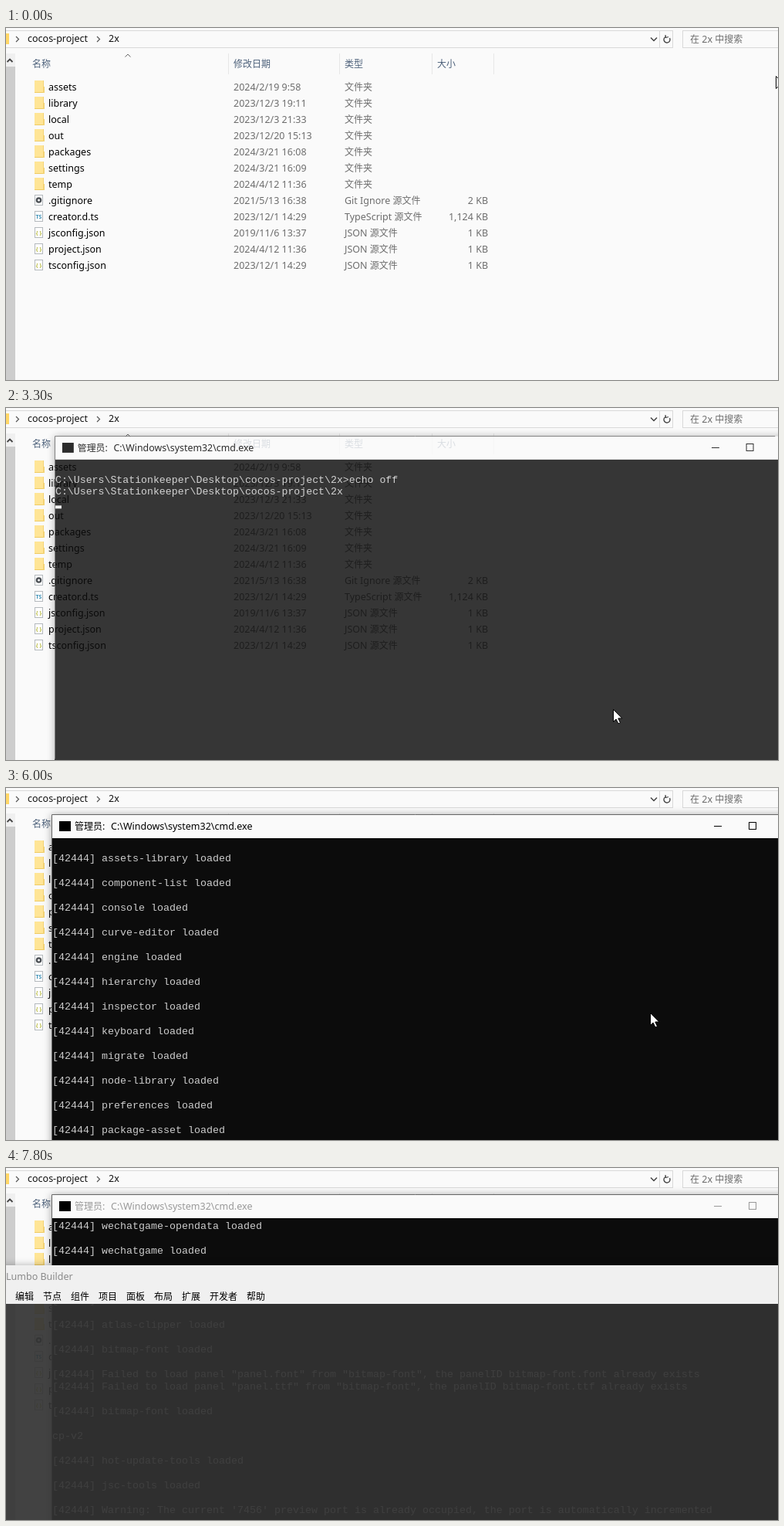
Write an HTML page with a canvas that moves like this. It is 1001x456 px and loops after 7.9 s.

```html
<!DOCTYPE html>
<html lang="zh">
<head>
<meta charset="utf-8">
<title>Open project from the context menu</title>
<style>
html, body { margin: 0; width: 100%; height: 100%; overflow: hidden; background: #fafafa; }
canvas { display: block; }
</style>
</head>
<body>
<canvas id="stage" width="1001" height="456"></canvas>
<script>
const W = 1001, H = 456, LOOP = 7900, STEP = 100;
const stage = document.getElementById('stage').getContext('2d');
const sheet = document.createElement('canvas');
sheet.width = W; sheet.height = H;
const sheetCtx = sheet.getContext('2d');
let g = stage;

const UI = { latin: '12.5px "Noto Sans", "Open Sans", sans-serif', cjk: '12px "Noto Sans CJK SC", "Noto Sans CJK", sans-serif' };
const MONO = { latin: '13.333px "Liberation Mono", monospace', cjk: '300 16px "Noto Sans CJK SC", "Noto Sans CJK", sans-serif' };
const GREY = '#6d6d6d', PAGE = '#fafafa';

// Latin and CJK runs have their own font sizes; returns the end of the text.
function text(s, x, y, color, face = UI) {
  g.fillStyle = color;
  for (const run of s.match(/[\u2e80-\uffef]+|[^\u2e80-\uffef]+/g) || []) {
    g.font = run.charCodeAt(0) > 0x2e7f ? face.cjk : face.latin;
    g.fillText(run, x, y);
    x += g.measureText(run).width;
  }
  return x;
}

function box(x, y, w, h, fill, line) {
  if (fill) { g.fillStyle = fill; g.fillRect(x, y, w, h); }
  if (line) { g.lineWidth = 1; g.strokeStyle = line; g.strokeRect(x + .5, y + .5, w - 1, h - 1); }
}

function path(points, color, width = 1, fill) {
  g.beginPath();
  points.forEach(([x, y]) => g.lineTo(x, y));
  if (fill) { g.closePath(); g.fillStyle = fill; g.fill(); }
  g.strokeStyle = color; g.lineWidth = width; g.stroke();
}

function disc(x, y, r, color) {
  g.beginPath(); g.arc(x, y, r, 0, 7); g.fillStyle = color; g.fill();
}

// Draws a group as one translucent sheet, scaled about (cx, cy).
function layer(alpha, scale, cx, cy, draw) {
  g = sheetCtx;
  g.setTransform(1, 0, 0, 1, 0, 0);
  g.clearRect(0, 0, W, H);
  g.setTransform(scale, 0, 0, scale, cx * (1 - scale), cy * (1 - scale));
  draw();
  g = stage;
  g.globalAlpha = alpha;
  g.drawImage(sheet, 0, 0);
  g.globalAlpha = 1;
}

function shadowed(draw) {
  g.save();
  g.shadowColor = 'rgba(0,0,0,.35)'; g.shadowBlur = 10; g.shadowOffsetY = 1;
  draw();
  g.restore();
}

// Keys are [time, value...]; an optional ease shapes each span.
function track(keys, t, ease = u => u) {
  let i = 0;
  while (i < keys.length - 1 && keys[i + 1][0] <= t) i++;
  const a = keys[i], b = keys[i + 1] || a;
  const u = b === a ? 0 : ease(Math.max(0, (t - a[0]) / (b[0] - a[0])));
  return a.slice(1).map((v, k) => v + (b[k + 1] - v) * u);
}

// ---- file explorer ----
const FILES = [
  ['assets', '2024/2/19 9:58'], ['library', '2023/12/3 19:11'], ['local', '2023/12/3 21:33'],
  ['out', '2023/12/20 15:13'], ['packages', '2024/3/21 16:08'], ['settings', '2024/3/21 16:09'],
  ['temp', '2024/4/12 11:36'],
  ['.gitignore', '2021/5/13 16:38', 'Git Ignore', '2 KB'],
  ['creator.d.ts', '2023/12/1 14:29', 'TypeScript', '1,124 KB'],
  ['jsconfig.json', '2019/11/6 13:37', 'JSON', '1 KB'],
  ['project.json', '2024/4/12 11:36', 'JSON', '1 KB'],
  ['tsconfig.json', '2023/12/1 14:29', 'JSON', '1 KB']
];

function icon(kind, y) {
  if (!kind) {
    box(37, y - 8, 12, 16, '#ffe596');
    box(37, y + 7, 13, 1, '#efcb62');
    box(48, y - 8, 1, 8, '#f3d375');
    box(48, y, 2, 8, '#f3d375');
    return;
  }
  box(37, y - 7, 11, 14, '#fff', '#b4b9bd');
  if (kind === 'Git Ignore') {
    disc(42.5, y, 3.8, '#4a4f54');
    disc(42.5, y, 1.5, '#fff');
  } else {
    g.textAlign = 'center';
    g.font = 'bold 7px "Open Sans", sans-serif';
    g.fillStyle = kind === 'JSON' ? '#b5b83a' : '#3b8fb5';
    g.fillText(kind === 'JSON' ? '{ }' : 'TS', 42.5, y + 2.5);
    g.textAlign = 'left';
  }
}

function explorer(focused) {
  box(0, 0, W, H, PAGE);
  box(-2, 3, 867, 23, null, '#d9d9d9');
  box(847, 4, 1, 21, '#d9d9d9');
  box(877, 3, 130, 23, null, '#d9d9d9');
  box(0, 7, 4, 14, '#ffd766');
  for (const x of [13, 118]) path([[x, 11], [x + 3.5, 14.5], [x, 18]], '#555', 1.2);
  text('cocos-project', 28, 18, '#111');
  text('2x', 133, 18, '#111');
  path([[836, 12.5], [840, 16.5], [844, 12.5]], '#444', 1.5);
  g.beginPath(); g.arc(857, 15, 4, -.5, 4.4); g.lineWidth = 1.4; g.stroke();
  path([[855, 9], [855.5, 12.5], [859, 11.5]], '#444', 1.3);
  text('在 2x 中搜索', 887, 18.5, GREY);

  box(0, 33, 12, H, '#f0f0f0');
  box(0, 50, 12, H, '#cdcdcd');
  path([[1.5, 44], [5, 40.5], [8.5, 44]], '#444', 1.8);

  const head = '#4c607a';
  for (const [label, x] of [['名称', 34], ['修改日期', 295], ['类型', 439], ['大小', 559]]) text(label, x, 51, head);
  for (const x of [288, 432, 552, 632]) box(x, 33, 1, 27, '#e7e7e7');
  path([[154.5, 37.5], [158, 34], [161.5, 37.5]], '#666');

  FILES.forEach(([name, date, kind, size], i) => {
    const y = 76 + 21 * i;
    icon(kind, y);
    text(name, 55, y + 5, '#000');
    text(date, 295, y + 5, GREY);
    text(kind ? kind + ' 源文件' : '文件夹', 439, y + 5, GREY);
    if (size) { g.textAlign = 'right'; text(size, 625, y + 5, GREY); g.textAlign = 'left'; }
  });
  if (focused) box(31, 297, 598, 22, null, '#99d1ff');
}

// ---- context menu ----
const MENU = [
  ['查看(V)', 219], ['排序方式(O)', 241], ['分组依据(E)', 263], ['刷新(R)', 285],
  ['自定义文件夹(F)...', 315], ['粘贴(P)', 345, 1], ['粘贴快捷方式(S)', 367, 1],
  ['cce open', 389], ['授予访问权限(G)', 419], ['新建(W)', 449]
];

function menuItem([label, y, disabled], hot) {
  if (hot) box(744, y - 11, W, 22, '#fff');
  if (label === 'cce open') disc(760, y, 6.5, '#555');
  text(label, 776, y + 4.5, disabled ? GREY : '#000');
}

function contextMenu(mouseY) {
  shadowed(() => box(741, 205, W, H, '#eee'));
  box(741, 205, W, H, null, '#a0a0a0');
  for (const y of [300, 330, 404, 434]) box(769, y, W, 1, '#c6c6c6');
  MENU.forEach(item => menuItem(item, Math.abs(mouseY - item[1]) < 11));
}

// ---- console ----
const HOME = 'C:\\Users\\Stationkeeper\\Desktop\\cocos-project\\2x';
const BLUE = '#3b78ff', CYAN = '#3a96dd', GREEN = '#13a10e', PLAIN = '#ccc', BRIGHT = '#f2f2f2';
const QUESTION = [['? ', GREEN], ['请选择打开项目使用的creator编辑器 ', BRIGHT]];
const INTRO = ['', HOME + '>echo off', HOME];
const ASKING = [...INTRO, [...QUESTION, ['(Use arrow keys)', PLAIN]], [['> 2.4.10', CYAN]]];

const loaded = names => names.split(' ').flatMap(n => [`[42444] ${n} loaded`, '']);
const clash = id => `[42444] Failed to load panel "panel.${id}" from "bitmap-font", the panelID bitmap-font.${id} already exists`;
const OUTPUT = [
  ...INTRO,
  [...QUESTION, ['2.4.10', CYAN]],
  [[`E:\\cocos-editors\\2.4.10\\CocosCreator.exe --nologin --path ${HOME} --inspect=2021`, BLUE]],
  [['请使用chrome浏览器打开： chrome://inspect/#devices', GREEN]],
  [['在Configure增加配置 localhost:2021', GREEN]],
  [['详细教程: https://juejin.cn/post/7047050908865134628/', GREEN]],
  '',
  ...loaded('app asset-db assets-library component-list console curve-editor engine hierarchy inspector keyboard migrate node-library preferences package-asset'),
  ...loaded('package-manager runtime-adapters runtime-dev-tools ui-kit-preview-extra ui-kit-preview alipay-minigame assets baidugame-opendata baidugame builder bytedance-opendata bytedance'),
  ...loaded('cocos-play cocos-runtime cocos-services cpk-publish fb-instant-games huawei-agc jkw-game link-sure oppo-runtime qgame quickgame vivo-runtime'),
  ...loaded('wechatgame-opendata wechatgame wechatgame-subcontext xiaomi-runtime atlas-clipper bitmap-font'),
  clash('font'), clash('ttf'), '',
  ...loaded('bitmap-font'), 'cp-v2', '', ...loaded('hot-update-tools jsc-tools'),
  "[42444] Warning: The current '7456' preview port is already occupied, the port is automatically incremented"
];
const SCROLL = [[5400, 0], [5500, 4], [5600, 8], [5800, 8], [6600, 24], [7000, 36], [7100, 36], [7700, 85]];

function consoleWindow(t) {
  shadowed(() => box(59, 34, W, H, '#0c0c0c'));
  box(59, 34, W, 31, '#fafafa');
  path([[W, 34.5], [59.5, 34.5], [59.5, H]], '#666');
  box(69, 43, 15, 13, '#000');
  const ink = t < 7700 ? '#000' : '#999';
  text('管理员:', 89, 54, ink);
  text('C:\\Windows\\system32\\cmd.exe', 136, 54, ink);
  box(918, 49, 10, 1, ink);
  box(963, 44, 10, 10, null, ink);

  const rows = t < 3600 ? INTRO : t < 4800 ? ASKING : OUTPUT;
  const [pos] = track(SCROLL, t);
  const top = t < 5500 ? 0 : pos >= 85 ? 85 : 2 * Math.round(pos / 2);
  const count = t >= 4800 && t < 5500 ? 8 : 25;
  rows.slice(top, top + count).forEach((row, i) => {
    let x = 60;
    for (const [s, color] of Array.isArray(row) ? row : [[row, PLAIN]]) x = text(s, x, 79 + 16 * i, color, MONO);
  });
  const caret = t < 3600 ? 3 : t >= 4800 && t < 5500 ? 10 : 0;
  if (caret) box(60, 77 + 16 * caret, 8, 4, BRIGHT);
}

// ---- editor window ----
const TABS = '编辑 节点 组件 项目 面板 布局 扩展 开发者 帮助'.split(' ');

function editorBody() {
  box(-20, 176, W + 40, H, '#333');
}

function editorHeader() {
  shadowed(() => box(-20, 126, W + 40, 50, '#f0f0f0'));
  g.clearRect(-20, 176, W + 40, H);
  text('Lumbo Builder', 0, 145, '#8a8a8a');
  let x = 12;
  for (const tab of TABS) { text(tab, x, 171, '#000'); x += 12 * tab.length + 12; }
}

// ---- pointer ----
const POINTER = [
  [0, 998, 62], [800, 750, 204], [1000, 741, 204], [1700, 741, 204], [2300, 787, 395], [2500, 787, 395],
  [2800, 787, 390], [3500, 787, 390], [4000, 765, 360], [5800, 765, 360], [6600, 958, 170], [7000, 1010, 100]
];
const ARROW = [[0, 0], [0, 16], [3.6, 12.6], [6.4, 18.4], [9, 17.2], [6.3, 11.5], [11.3, 11.5]];

function pointer(x, y) {
  path([...ARROW, ARROW[0]].map(([dx, dy]) => [x + .5 + dx, y + .5 + dy]), '#000', 1, '#fff');
}

function render(t) {
  const [mx, my] = track(POINTER, t, u => u * (1.6 - .6 * u));
  explorer(t >= 1300 && t < 3000);
  if (t >= 1400 && t < 3100) {
    const alpha = t < 1500 || t >= 3000 ? .5 : 1;
    layer(alpha, 1, 0, 0, () => contextMenu(t < 1800 ? 0 : my));
  } else if (t === 3100) {
    layer(.5, 1, 0, 0, () => menuItem(MENU[7], true));
  }
  if (t >= 3200) {
    const [alpha, scale] = track([[3200, .35, .955], [3300, .82, .9918], [3400, 1, 1]], t);
    layer(alpha, scale, 548, 290, () => consoleWindow(t));
  }
  if (t >= 7700) {
    const [body, header, scale] = track([[7700, .45, .5, .97], [7800, .92, 1, 1]], t);
    layer(body, scale, 500, 400, editorBody);
    layer(header, scale, 500, 400, editorHeader);
  }
  pointer(Math.round(mx), Math.round(my));
}

let shown = -1;
function tick() {
  const t = Math.floor(performance.now() % LOOP / STEP) * STEP;
  if (t !== shown) render(shown = t);
  requestAnimationFrame(tick);
}
tick();
</script>
</body>
</html>
```
